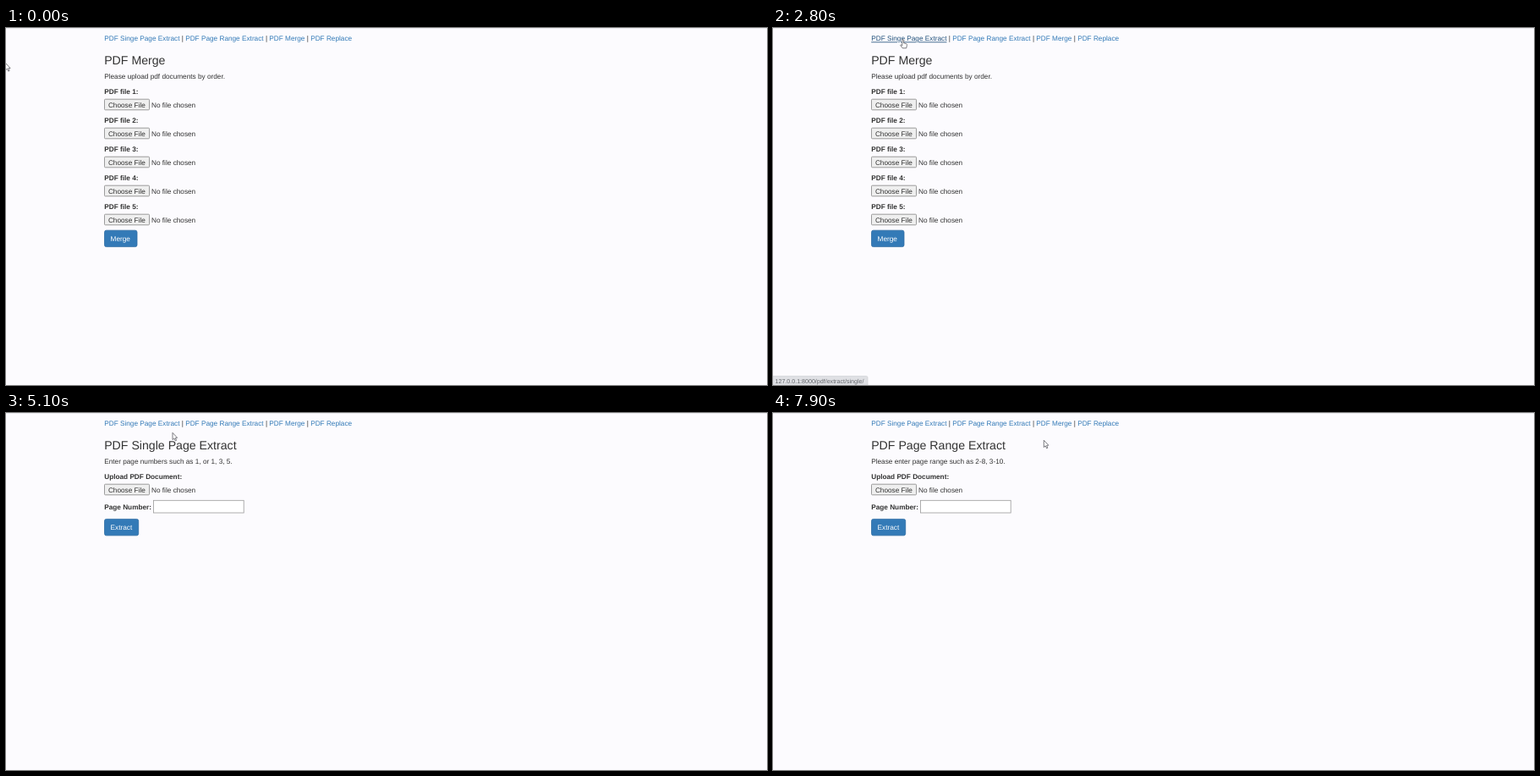
Animation of 900 by 422 pixels, one loop 8 s. Source, as an HTML page:

```html
<!DOCTYPE html>
<html lang="en">
<head>
<meta charset="utf-8">
<title>PDF tools</title>
<style>
  html, body { margin: 0; width: 100%; height: 100%; overflow: hidden; background: #fcfbfe; }
  svg { display: block; width: 900px; height: 422px; }
  text { font: 8.24px "Liberation Sans", Arial, sans-serif; fill: #333; text-rendering: geometricPrecision; white-space: pre; }
  .title { font-size: 14.15px; }
  .label { font-weight: bold; }
  .link { fill: #337ab7; }
  .link.on { fill: #23527c; text-decoration: underline; }
  .file { fill: #efefef; stroke: #858585; stroke-width: .8; }
  .input { fill: #fff; stroke: #9a9a9a; stroke-width: .8; }
  .btn { fill: #337ab7; stroke: #2e6da4; stroke-width: .8; }
  .btn-text { fill: #fff; }
  #status rect { fill: #dfe0e4; stroke: #cdced2; stroke-width: .6; }
  #status text { font-size: 7.1px; fill: #62656a; }
  #cursor path { fill: #fff; stroke: #5c5c62; stroke-width: .8; stroke-linejoin: round; }
</style>
</head>
<body>
<svg viewBox="0 0 900 422">
  <rect width="900" height="422" fill="#fcfbfe"/>
  <rect width="900" height="1" fill="#ececf0"/>
  <text x="116.2" y="15.4"><tspan class="link">PDF Singe Page Extract</tspan> | <tspan class="link">PDF Page Range Extract</tspan> | <tspan class="link">PDF Merge</tspan> | <tspan class="link">PDF Replace</tspan></text>
  <g id="page"></g>
  <g id="status">
    <rect x="-1" y="411.5" width="113" height="12" rx="1.5"/>
    <text x="2.5" y="420.4"></text>
  </g>
  <g id="cursor">
    <path id="arrow" d="M0 0V8.3L1.9 6.6 3.3 9.6 4.6 9 3.3 6.2 5.6 6Z"/>
    <path id="hand" d="M-.9 5V.6Q-.9-.2 0-.2T.9.6V4L4 4.8Q4.9 5.2 4.7 6.5L4 10H-.5L-3 6.5Q-2.6 5.4-.9 7Z"/>
  </g>
</svg>
<script>
const $ = id => document.getElementById(id);
const LOOP = 8000, STEP = 100, LEFT = 116.2, STATUS_DELAY = 200;

const text = (x, y, s, cls = '') => `<text x="${x}" y="${y}" class="${cls}">${s}</text>`;
const box = (x, y, w, h, cls, r = 0) =>
  `<rect x="${x}" y="${y}" width="${w}" height="${h}" rx="${r}" class="${cls}"/>`;
const head = (title, note) => text(LEFT, 43.2, title, 'title') + text(LEFT, 60, note);
const fileRow = (label, i = 0) => {
  const y = 77.7 + i * 34;
  return text(LEFT, y, label, 'label') + box(116.5, y + 6.5, 53, 12.6, 'file', 1) +
    text(120.9, y + 15.8, 'Choose File') + text(172, y + 15.8, 'No file chosen');
};
const button = (y, w, label) =>
  box(116.5, y, w, 19.4, 'btn', 2.2) + text(123.6, y + 12.7, label, 'btn-text');

const mergePage = head('PDF Merge', 'Please upload pdf documents by order.') +
  [1, 2, 3, 4, 5].map((n, i) => fileRow(`PDF file ${n}:`, i)).join('') +
  button(239.2, 38.5, 'Merge');
const extractPage = (title, note) => head(title, note) + fileRow('Upload PDF Document:') +
  text(LEFT, 113.6, 'Page Number:', 'label') + box(174.4, 103.3, 106.8, 14.7, 'input') +
  button(125.4, 40.2, 'Extract');

const pages = [
  { at: 0, html: mergePage },
  { at: 4000, html: extractPage('PDF Single Page Extract', 'Enter page numbers such as 1, or 1, 3, 5.') },
  { at: 6800, html: extractPage('PDF Page Range Extract', 'Please enter page range such as 2-8, 3-10.') }
];
const slugs = ['single', 'range'];

const home = { x: -.5, y: 41.5 };
const moves = [
  { from: 0, to: 550, x: 121, y: 106 },
  { from: 550, to: 1100, x: 53, y: 127 },
  { from: 1600, to: 2500, x: 153.7, y: 13.8 },
  { from: 4500, to: 5000, x: 190, y: 50 },
  { from: 5000, to: 5100, x: 197, y: 23.3 },
  { from: 5100, to: 5700, x: 257.7, y: 14.2 },
  { from: 7500, to: 7900, x: 320.3, y: 32.2 }
];

const ease = u => u * u * (3 - 2 * u);
const clamp = u => Math.min(1, Math.max(0, u));
function pointer(t) {
  return moves.reduce((p, m) => {
    const e = ease(clamp((t - m.from) / (m.to - m.from)));
    return { x: p.x + (m.x - p.x) * e, y: p.y + (m.y - p.y) * e };
  }, home);
}

const links = [...document.querySelectorAll('.link')];
const spans = links.map(el => {
  const x = el.getStartPositionOfChar(0).x;
  return [x, x + el.getComputedTextLength()];
});
const linkUnder = ({ x, y }) =>
  y > 8 && y < 18.2 ? spans.findIndex(([a, b]) => x >= a && x <= b) : -1;

const pageAt = t => pages.findLast(p => p.at <= t) || pages[0];

// A fresh page ignores the pointer until it moves.
function hovered(t) {
  const p = pointer(t), q = pointer(pageAt(t).at);
  return p.x === q.x && p.y === q.y ? -1 : linkUnder(p);
}

let shown = -1, page;

function draw(t) {
  const next = pageAt(t);
  if (next !== page) $('page').innerHTML = (page = next).html;

  const active = hovered(t);
  links.forEach((el, i) => el.classList.toggle('on', i === active));

  // The status bar lags and skips links that are only brushed.
  const late = hovered(t - STATUS_DELAY);
  const steady = late >= 0 && late === hovered(t - STATUS_DELAY - STEP);
  $('status').style.display = steady ? '' : 'none';
  if (steady) $('status').lastElementChild.textContent = `127.0.0.1:8000/pdf/extract/${slugs[late]}/`;

  const p = pointer(t), hand = linkUnder(p) >= 0;
  $('hand').style.display = hand ? '' : 'none';
  $('arrow').style.display = hand ? 'none' : '';
  $('cursor').setAttribute('transform', `translate(${p.x} ${p.y})`);
}

const start = performance.now();
function tick() {
  const t = Math.floor((performance.now() - start) % LOOP / STEP) * STEP;
  if (t !== shown) draw(shown = t);
  requestAnimationFrame(tick);
}
tick();
</script>
</body>
</html>
```
